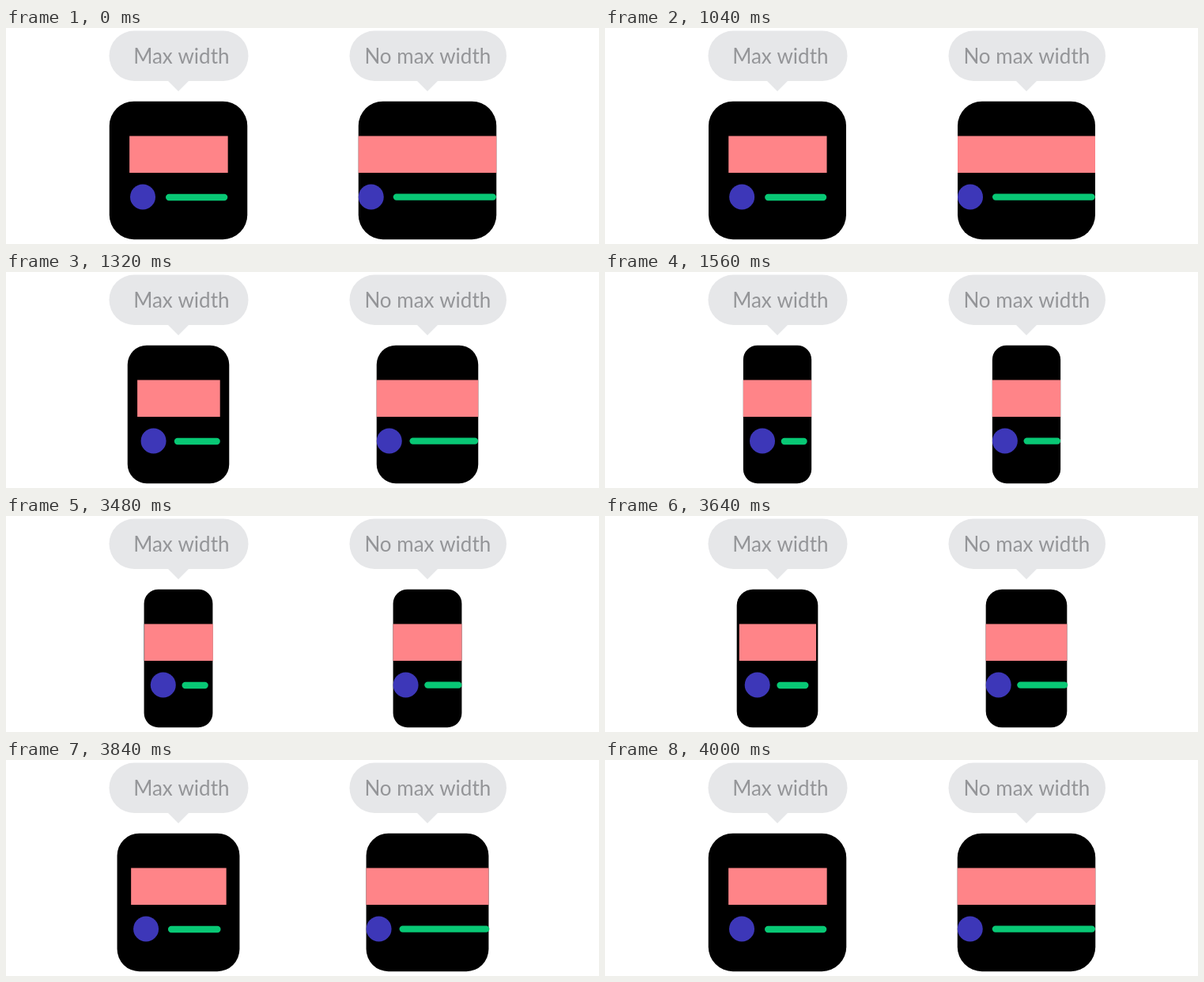
An HTML page with a canvas for the animation above (5.04 s loop, 750x273 px).

```html
<!DOCTYPE html>
<html lang="en">
<head>
<meta charset="utf-8">
<title>Max width</title>
<style>
  html, body { margin: 0; width: 100%; height: 100%; overflow: hidden; background: #fff; }
  canvas { display: block; }
</style>
</head>
<body>
<canvas width="750" height="273"></canvas>
<script>
const ctx = document.querySelector('canvas').getContext('2d');
const LOOP = 5040, STEP = 40, MOVE = 560, SHRINK = 1000, GROW = 3440;
const PINK = '#ff8488', BLUE = '#3d37b8', GREEN = '#08c875';

const mix = (a, b, p) => a + (b - a) * p;

// Cubic bezier easing (.54, 0, .62, 1), solved by bisection
function ease(t) {
  if (t <= 0) return 0;
  if (t >= 1) return 1;
  let lo = 0, hi = 1, s;
  for (let i = 0; i < 24; i++) {
    s = (lo + hi) / 2;
    const x = 3 * (1 - s) * s * ((1 - s) * 0.54 + s * 0.62) + s ** 3;
    if (x < t) lo = s; else hi = s;
  }
  return s * s * (3 - 2 * s);
}

const bend = (p, k) => p + k * p * (1 - p);

function fillRound(x, y, w, h, r, color) {
  ctx.fillStyle = color;
  ctx.beginPath();
  ctx.roundRect(x, y, w, h, r);
  ctx.fill();
}

function bubble(x, w, tip, label, labelX) {
  fillRound(x, 3.5, w, 63.5, 31.7, '#e6e7e9');
  ctx.beginPath();
  ctx.moveTo(tip - 14, 66);
  ctx.lineTo(tip, 80);
  ctx.lineTo(tip + 14, 66);
  ctx.fill();
  ctx.fillStyle = '#949598';
  ctx.font = '26px Lato, sans-serif';
  ctx.textAlign = 'center';
  ctx.fillText(label, labelX, 45);
}

function card(center, w, radius, pinkWidth, dotX, lineStart, lineEnd, lineY) {
  fillRound(center - w / 2, 92.7, w, 174.5, radius, '#000');
  const pw = Math.min(w, pinkWidth);
  ctx.fillStyle = PINK;
  ctx.fillRect(center - pw / 2 + (pw < w ? 0.4 : 0), 136.5, pw, 46.5);
  fillRound(dotX - 16, 197.5, 32, 32, 16, BLUE);
  fillRound(lineStart, lineY - 4.2, lineEnd - lineStart, 8.4, 4.2, GREEN);
}

function draw(time) {
  const growing = time >= GROW;
  const shrunk = ease((time - SHRINK) / MOVE);
  const grown = ease((time - GROW) / MOVE);
  // Parts share one pace while shrinking and drift apart while growing
  const part = (wide, narrow, kGrow = 0, kShrink = 0) =>
    mix(wide, narrow, growing ? 1 - bend(grown, kGrow) : bend(shrunk, kShrink));

  ctx.clearRect(0, 0, 750, 273);
  bubble(130.5, 176, 218, 'Max width', 221.8);
  bubble(434.5, 198.5, 533, 'No max width', 533.3);

  const w = part(174.5, 86.3), radius = part(31, 18);
  card(218, w, radius, part(124.5, 86.3, 0.68),
    part(173, 199, 0.38), part(202, 222.7, 0.48), part(280.3, 255.7, -0.76, -0.54), 214);
  card(533, w, radius, w,
    533 - w / 2 + 16, part(489.7, 529.5, 0.15), part(620, 576.2, 0.15), 213.6);
}

function tick() {
  const time = performance.now() % LOOP;
  draw(Math.floor(time / STEP) * STEP);
  requestAnimationFrame(tick);
}
tick();
</script>
</body>
</html>
```
